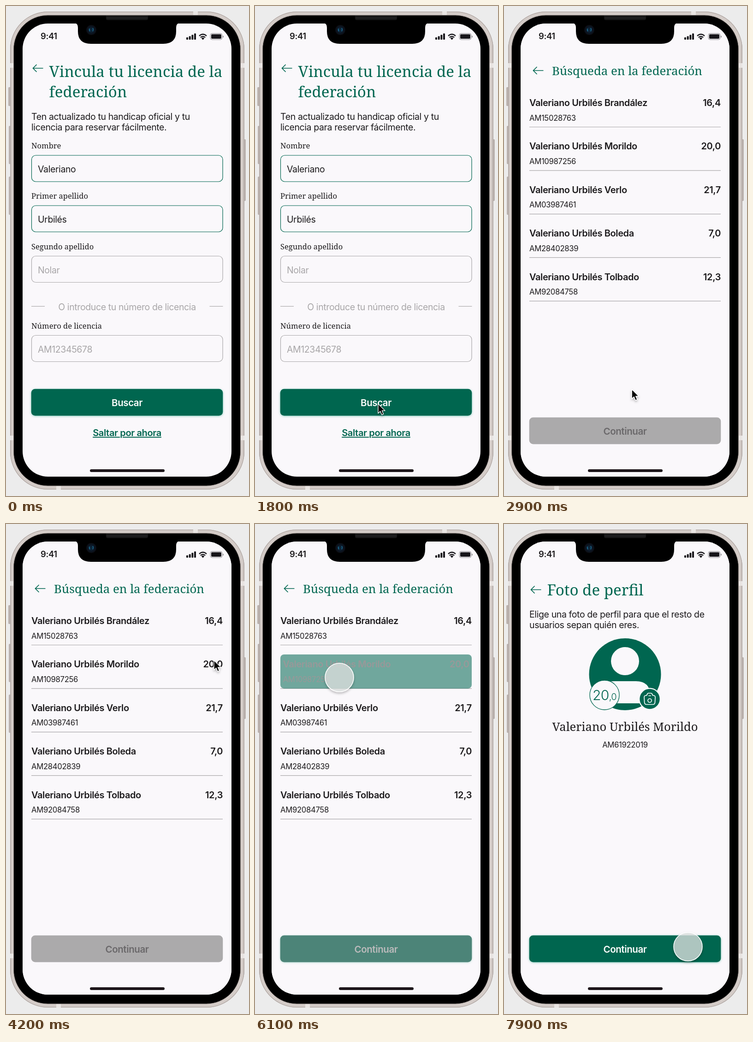
Animation of 527x1063 px, one loop 8000 ms. Source, as an HTML page:

```html
<!DOCTYPE html>
<html lang="es">
<head>
<meta charset="utf-8">
<title>Vincula tu licencia</title>
<style>
html, body { margin: 0; width: 100%; height: 100%; overflow: hidden; background: #ececec; }
svg { display: block; width: 100vw; height: 100vh; }
text { font-family: Inter, "Open Sans", sans-serif; font-size: 19.5px; letter-spacing: -.02em; fill: #1c1a1c; }
.serif { font-family: "Noto Serif", "Liberation Serif", serif; font-weight: 500; letter-spacing: 0; }
.title { font-size: 33.1px; fill: #006650; }
.head { font-size: 25.8px; fill: #006650; }
.label { font-size: 16.5px; }
.person { font-size: 25.6px; }
.bold { font-size: 20px; font-weight: 600; }
.cta { font-size: 20.5px; font-weight: 600; }
.id { font-size: 16.7px; }
.hint { fill: #a8a6a8; }
.link { font-size: 20.1px; font-weight: 600; fill: #006650; }
.mid { text-anchor: middle; }
.end { text-anchor: end; }
.light { fill: #fff; }
</style>
</head>
<body>
<svg viewBox="0 0 527 1063" preserveAspectRatio="none">
  <defs>
    <linearGradient id="rim" x1="0" x2="1" y1="0" y2="0">
      <stop offset="0" stop-color="#a9a09c"/>
      <stop offset=".006" stop-color="#d4ccc8"/>
      <stop offset=".994" stop-color="#d4ccc8"/>
      <stop offset="1" stop-color="#a9a09c"/>
    </linearGradient>
    <radialGradient id="lens">
      <stop offset="0" stop-color="#0b2a40"/>
      <stop offset=".5" stop-color="#0c1a2a"/>
      <stop offset="1" stop-color="#0b0b10"/>
    </radialGradient>
    <filter id="glow" x="-10%" y="-30%" width="120%" height="160%">
      <feDropShadow dx="0" dy="1" stdDeviation="2.2" flood-color="#1f9c7c" flood-opacity=".5"/>
    </filter>
    <filter id="drop" x="-40%" y="-40%" width="180%" height="180%">
      <feDropShadow dx="0" dy="3" stdDeviation="2.5" flood-color="#000" flood-opacity=".3"/>
    </filter>
    <clipPath id="screen"><rect x="36" y="38" width="453" height="983" rx="55"/></clipPath>
    <clipPath id="disc"><circle cx="262.5" cy="326" r="78"/></clipPath>
  </defs>

  <rect width="527" height="1063" fill="#ececec"/>
  <g fill="#bbb2ae">
    <rect x="5" y="176" width="6" height="41" rx="2"/>
    <rect x="6" y="260" width="5" height="83" rx="2"/>
    <rect x="6" y="370" width="5" height="83" rx="2"/>
    <rect x="514" y="289" width="6" height="134" rx="2"/>
  </g>
  <rect x="9" y="12" width="508" height="1037" rx="82" fill="url(#rim)"/>
  <rect x="9.7" y="12.7" width="506.6" height="1035.6" rx="81.3" fill="none" stroke="#b3aaa6" stroke-width="1.4"/>
  <path d="M9 124h9v10h-9zM508 124h9v10h-9zM9 932h9v10h-9zM508 932h9v10h-9zM406 12h10v9h-10zM109 1040h10v9h-10z" fill="#e9e5e3"/>
  <rect x="16.5" y="20" width="492" height="1021" rx="74" fill="#000" stroke="#8f8783"/>

  <g clip-path="url(#screen)">
    <g id="form"></g>
    <g id="list"></g>
    <g id="profile"></g>
    <rect x="182" y="1005" width="162" height="6" rx="3" fill="#1d161a"/>
  </g>

  <path d="M148 36H377Q369 38 369 47V55Q369 82 341 82H184Q156 82 156 55V47Q156 38 148 36Z" fill="#000"/>
  <path d="M217 21H308V27Q308 30.5 304 30.5H221Q217 30.5 217 27Z" fill="#171718"/>
  <path d="M219 26H306" stroke="#2b2b2d" stroke-width="2" stroke-dasharray="1 1"/>
  <circle cx="185" cy="52" r="11" fill="url(#lens)"/>
  <path d="M181 49q-1 4 1 6M188 48q2 3 0 7" stroke="#1e7399" stroke-width="1.5" fill="none"/>

  <text x="75" y="72" style="font-size:18.5px;font-weight:600">9:41</text>
  <g fill="#17151a">
    <rect x="391" y="68" width="4" height="5" rx="1"/>
    <rect x="396.7" y="65.5" width="4" height="7.5" rx="1"/>
    <rect x="402.4" y="62.5" width="4" height="10.5" rx="1"/>
    <rect x="408" y="59.5" width="4" height="13.5" rx="1"/>
    <path d="M427 73.5l-3.3-3.6q3.3-2.8 6.6 0z"/>
    <rect x="445" y="61.3" width="22" height="9.8" rx="2"/>
    <path d="M470.2 64v4.8q1.8-.8 1.8-2.4t-1.8-2.4z" opacity=".5"/>
  </g>
  <path d="M419 64.8q8-7 16 0M421.8 68.2q5.2-4.4 10.4 0" fill="none" stroke="#17151a" stroke-width="2.4"/>
  <rect x="443.2" y="59.5" width="25.6" height="13.4" rx="3.8" fill="none" stroke="#17151a" stroke-opacity=".5"/>

  <g id="arrow">
    <path d="M0 0V20.5L4.7 16.2L8 23.8L11.6 22.2L8.4 14.9H15Z" fill="#000" stroke="#fff" stroke-width="1.3" stroke-linejoin="round" filter="url(#drop)"/>
  </g>
  <g id="touch">
    <circle r="31" fill="#e0e4e3" fill-opacity=".74" stroke="#fff" stroke-width="1.6" filter="url(#drop)"/>
  </g>
</svg>

<script>
const GREEN = '#006650', BG = '#faf8fb', LOOP = 8000;
const FIRST = 'Valeriano', LAST = 'Urbilés';
const PLAYERS = [
  ['Brandález', 'AM15028763', '16,4'],
  ['Morildo', 'AM10987256', '20,0'],
  ['Verlo', 'AM03987461', '21,7'],
  ['Boleda', 'AM28402839', '7,0'],
  ['Tolbado', 'AM92084758', '12,3']
];
const PICKED = 1;
const $ = id => document.getElementById(id);

// Markup helpers
const text = (x, y, cls, str, extra = '') => `<text x="${x}" y="${y}" class="${cls}" ${extra}>${str}</text>`;
const rule = (x1, x2, y) => `<path d="M${x1} ${y}H${x2}" stroke="#aaa8aa" stroke-width="1.2"/>`;
const back = (x, y) =>
  `<path d="M${x + 23} ${y}H${x + 1}m8-8l-8 8l8 8" fill="none" stroke="${GREEN}" stroke-width="1.7"/>`;
const page = inner => `<rect x="36" y="38" width="453" height="983" fill="${BG}"/>${inner}`;
const bar = (y, fill, extra = '') =>
  `<rect x="54.7" y="${y}" width="415.6" height="58" rx="8.5" fill="${fill}" ${extra}/>`;
const button = (y, label) =>
  bar(y, GREEN, 'filter="url(#glow)"') + text(262.5, y + 37.5, 'cta mid light', label);

function field(y, label, value, filled) {
  return text(55, y - 15, 'serif label', label) +
    `<rect x="55.5" y="${y}" width="414.5" height="57" rx="9" fill="none" stroke="${filled ? GREEN : '#aaa8aa'}" stroke-width="1.2"/>` +
    text(69, y + 37, filled ? '' : 'hint', value);
}

function row([name, id, score], i) {
  const y = 217 + i * 94.4;
  const box = i === PICKED
    ? `<rect id="pick" x="55" y="${y - 28.5}" width="415" height="74" rx="8" fill="${GREEN}"/>` : '';
  const tag = part => i === PICKED ? `id="${part}"` : '';
  return rule(55, 470, y + 45.5) + box +
    `<g ${tag('who')}>` + text(55, y, 'bold', `${FIRST} ${LAST} ${name}`) + text(55, y + 31.5, 'id', id) + '</g>' +
    `<g ${tag('score')}>` + text(470, y, 'bold end', score) + '</g>';
}

$('form').innerHTML = page(
  back(57.5, 135) +
  text(93.5, 154, 'serif title', 'Vincula tu licencia de la') +
  text(93.5, 198, 'serif title', 'federación') +
  text(55, 247, '', 'Ten actualizado tu handicap oficial y tu') +
  text(55, 270, '', 'licencia para reservar fácilmente.') +
  field(324, 'Nombre', FIRST, true) +
  field(433, 'Primer apellido', LAST, true) +
  field(542.5, 'Segundo apellido', 'Nolar', false) +
  rule(55, 84, 651.5) + rule(441.5, 470.5, 651.5) +
  text(262.5, 660, 'hint mid', 'O introduce tu número de licencia') +
  field(714.5, 'Número de licencia', 'AM12345678', false) +
  button(830.7, 'Buscar') +
  text(262.5, 932.5, 'link mid', 'Saltar por ahora', 'text-decoration="underline"')
);

$('list').innerHTML = page(
  back(62.5, 140) +
  text(104, 149.5, 'serif head', 'Búsqueda en la federación') +
  PLAYERS.map(row).join('') +
  bar(892.5, '#abaaab') +
  bar(892.5, GREEN, 'id="ready" filter="url(#glow)"') +
  text(262.5, 930, 'cta mid', 'Continuar', 'id="next"')
);

$('profile').innerHTML = page(
  back(57.5, 142.5) +
  text(93.5, 154.5, 'serif title', 'Foto de perfil') +
  text(55, 203, '', 'Elige una foto de perfil para que el resto de') +
  text(55, 226, '', 'usuarios sepan quién eres.') +
  `<circle cx="262.5" cy="326" r="78" fill="${GREEN}"/>
   <circle cx="262.5" cy="297.5" r="30.5" fill="${BG}"/>
   <path d="M208 389V372Q208 341 239 341H286Q317 341 317 372V389Z" fill="${BG}" clip-path="url(#disc)"/>
   <circle cx="218" cy="371" r="32" fill="${BG}" stroke="${GREEN}" stroke-width="1.3"/>` +
  text(218, 382, 'mid', '20<tspan font-size="20">,0</tspan>', `style="font-size:30px;font-weight:300;fill:${GREEN}"`) +
  `<circle cx="316" cy="379.5" r="22.8" fill="${GREEN}" stroke="${BG}" stroke-width="2.2"/>
   <g fill="none" stroke="#fff" stroke-width="1.7" stroke-linejoin="round" stroke-linecap="round">
     <path d="M304 376q0-4 4-4q2 0 2.5-2.5t3-2.5h5q2.5 0 3 2.5t2.5 2.5q4 0 4 4l-.6 11q-.3 4.5-4.5 4.5h-13.8q-4.2 0-4.5-4.5z"/>
     <circle cx="316" cy="383" r="4"/><path d="M314 372.5h4"/>
   </g>` +
  text(262.5, 448.5, 'serif person mid', `${FIRST} ${LAST} ${PLAYERS[PICKED][0]}`) +
  text(262.5, 485, 'id mid', 'AM61922019') +
  button(892.5, 'Continuar')
);

// Pointer stops: time, x, y
const PATH = [
  [500, 545, 610], [900, 297, 692], [1500, 267, 863], [2700, 267, 863],
  [4100, 451, 296], [4500, 451, 296], [5500, 183, 333], [6350, 183, 333],
  [6800, 399, 915], [8000, 399, 917]
];
const PRESSES = [[2000, 2600], [5800, 6300], [7400, 8100]];

const ease = (t, a, b) => {
  const k = Math.min(1, Math.max(0, (t - a) / (b - a)));
  return k * k * (3 - 2 * k);
};
const shade = (a, b, k) => `rgb(${a.map((v, i) => Math.round(v + (b[i] - v) * k))})`;
const fade = (id, k) => {
  $(id).style.opacity = k;
  $(id).style.visibility = k > 0 ? 'visible' : 'hidden';
};

function pointer(t) {
  let [, x, y] = PATH[0];
  for (let i = 1; i < PATH.length; i++) {
    const [t0, x0, y0] = PATH[i - 1], [t1, x1, y1] = PATH[i];
    if (t < t0) break;
    const k = ease(t, t0, t1);
    x = x0 + (x1 - x0) * k;
    y = y0 + (y1 - y0) * k;
  }
  return [x, y];
}

function draw(t) {
  fade('list', ease(t, 2210, 2510));
  fade('profile', ease(t, 7550, 7850));

  const sel = ease(t, 5940, 6240);
  const ink = shade([28, 26, 28], [255, 255, 255], sel);
  $('pick').style.opacity = $('ready').style.opacity = sel;
  $('who').setAttribute('transform', `translate(${10 * sel})`);
  $('score').setAttribute('transform', `translate(${-10 * sel})`);
  for (const el of document.querySelectorAll('#who text, #score text')) el.style.fill = ink;
  $('next').style.fill = shade([106, 104, 106], [255, 255, 255], sel);

  const [x, y] = pointer(t);
  const press = Math.max(...PRESSES.map(([a, b]) => ease(t, a, a + 150) * (1 - ease(t, b - 150, b))));
  const at = `translate(${x} ${y})`;
  $('arrow').setAttribute('transform', at);
  $('touch').setAttribute('transform', at);
  fade('arrow', t < 500 ? 0 : 1 - press);
  fade('touch', press);
}

// The picture advances ten times a second
const start = performance.now();
function tick() {
  const t = (performance.now() - start) % LOOP;
  draw(Math.floor(t / 100) * 100);
  requestAnimationFrame(tick);
}
draw(0);
requestAnimationFrame(tick);
</script>
</body>
</html>
```
